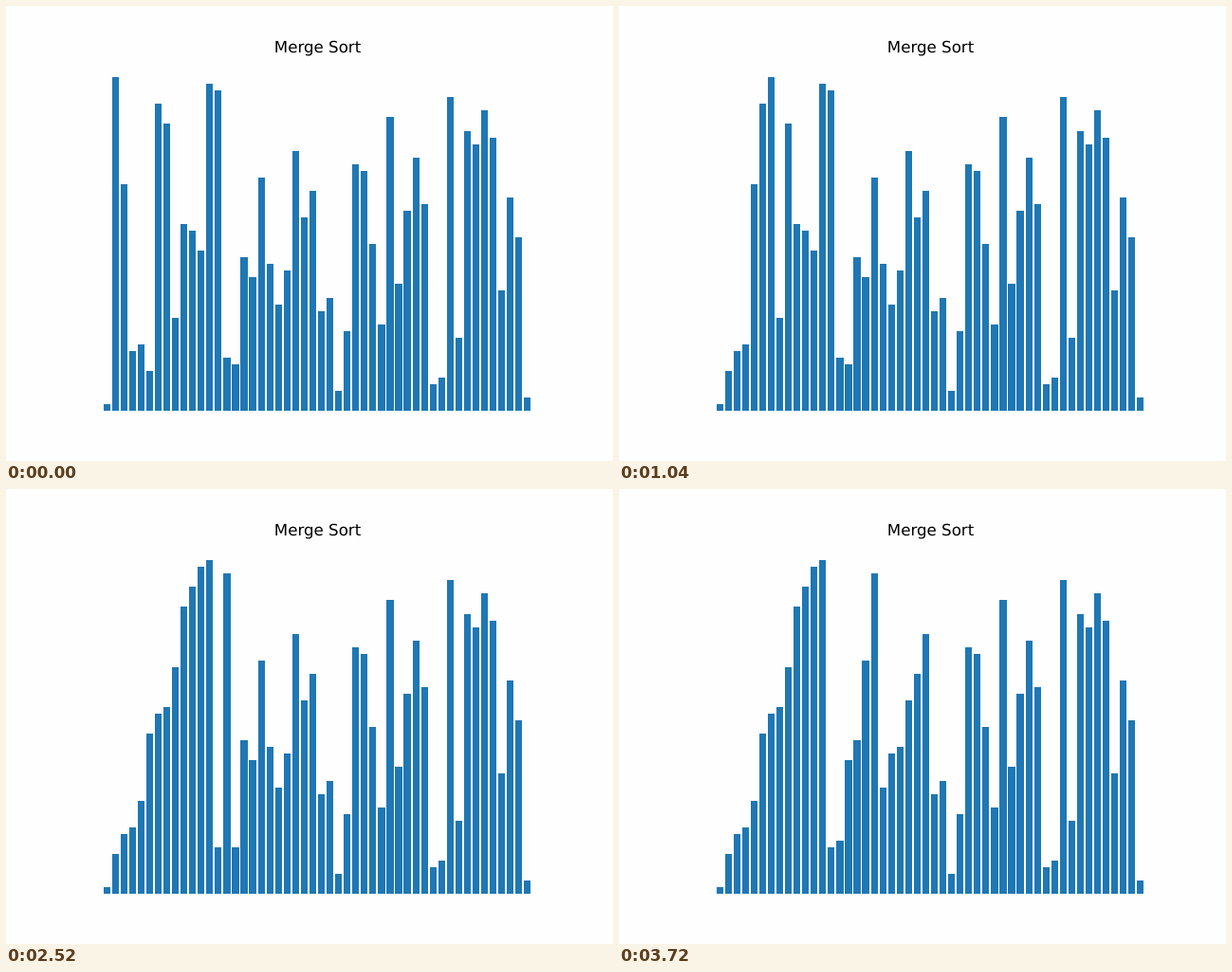
An HTML page that plays this animation: 640x480 px, repeating every 4 s.

```html
<!DOCTYPE html>
<html lang="en">
<head>
<meta charset="utf-8">
<title>Merge Sort</title>
<style>
  html, body { margin: 0; width: 100%; height: 100%; overflow: hidden; background: #fefefe; }
  svg { display: block; }
  text { font: 16.667px "DejaVu Sans", sans-serif; text-anchor: middle; text-rendering: geometricPrecision; }
</style>
</head>
<body>
<svg width="640" height="480" viewBox="0 0 640 480">
  <text x="328.5" y="49">Merge Sort</text>
  <g id="bars" fill="#1f77b4" shape-rendering="crispEdges"></g>
</svg>
<script>
const STEP_MS = 40, STEPS = 100;

// The shuffled input; every later state is computed by sorting it.
const input = [
  1, 50, 34, 9, 10, 6, 46, 43, 14, 28, 27, 24, 49, 48, 8, 7, 23, 20, 35, 22, 16, 21, 39, 29, 33,
  15, 17, 3, 12, 37, 36, 25, 13, 44, 19, 30, 38, 31, 4, 5, 47, 11, 42, 40, 45, 41, 18, 32, 26, 2
];

// Bars are 0.8 wide and fill the plot area up to a 5% margin.
const count = input.length;
const plot = { left: 80, top: 57.6, width: 496, height: 369.6 };
const margin = 0.05, barWidth = 0.8;
const base = plot.top + plot.height;
const unit = plot.height / (1 + margin) / count;
const pitch = plot.width / (1 + 2 * margin) / (count - 1 + barWidth);
const firstLeft = plot.left + plot.width * margin / (1 + 2 * margin);

// Yields after every single write and once more after each finished merge.
function* mergeSort(values, lo, hi) {
  if (lo >= hi) return;
  const mid = (lo + hi) >> 1;
  yield* mergeSort(values, lo, mid);
  yield* mergeSort(values, mid + 1, hi);
  const merged = values.slice(lo, hi + 1).sort((a, b) => a - b);
  for (const [i, value] of merged.entries()) {
    values[lo + i] = value;
    yield;
  }
  yield;
}

function record() {
  const values = [...input], states = [];
  const sorter = mergeSort(values, 0, count - 1);
  sorter.next(); // the first write happens before the first visible step
  while (states.length < STEPS) {
    sorter.next();
    states.push([...values]);
  }
  return states;
}

// Sets the start and size of a bar along one axis, snapped to whole pixels.
function setSpan(bar, start, end, [startName, sizeName]) {
  const from = Math.round(start);
  bar.setAttribute(startName, from);
  bar.setAttribute(sizeName, Math.round(end) - from);
}

const states = record();
const group = document.getElementById("bars");

const bars = input.map((_, i) => {
  const bar = document.createElementNS("http://www.w3.org/2000/svg", "rect");
  const left = firstLeft + i * pitch;
  setSpan(bar, left, left + barWidth * pitch, ["x", "width"]);
  return group.appendChild(bar);
});

function draw(ms) {
  const state = states[Math.floor(ms / STEP_MS) % STEPS];
  bars.forEach((bar, i) => setSpan(bar, base - state[i] * unit, base, ["y", "height"]));
}

let origin;
function tick(now) {
  origin ??= now;
  draw(now - origin);
  requestAnimationFrame(tick);
}
draw(0);
requestAnimationFrame(tick);
</script>
</body>
</html>
```
